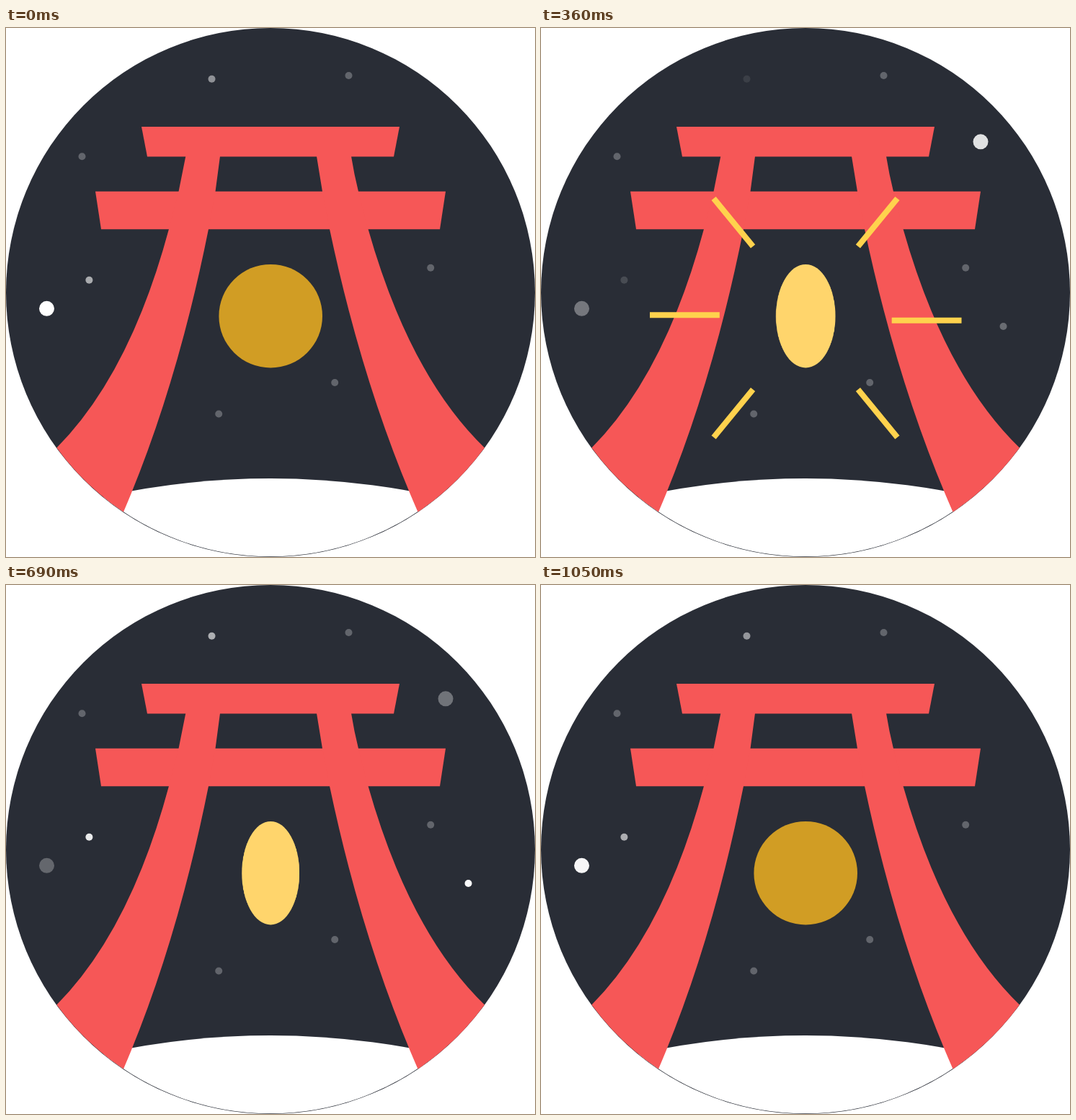
An HTML page that plays this animation: 734x734 px, repeating every 1.08 s.

```html
<!DOCTYPE html>
<html lang="en">
<head>
<meta charset="utf-8">
<title>Torii gate at night</title>
<style>
html, body { margin: 0; width: 100%; height: 100%; overflow: hidden; background: #fff; }
svg { display: block; width: 100vw; height: 100vh; }

.sky { fill: #292d36; }
.gate { fill: #f65757; }
.star { fill: #fff; animation: 1080ms linear infinite; }
.still { fill: #fff; opacity: .27; }

.coin {
  transform-origin: 367.2px 399.7px;
  animation: spin 540ms ease-in-out infinite, side 1080ms step-end infinite;
}
.rays {
  fill: none;
  stroke: #ffd24d;
  stroke-width: 8;
}
.rays line {
  stroke-dasharray: 1 3;
  animation: shoot 1080ms linear infinite;
}

.west  { animation-name: west; }
.east  { animation-name: east; }
.north { animation-name: north; }
.left  { animation-name: left; }
.right { animation-name: right; }

@keyframes spin {
  0%, 11.11% { transform: scaleX(1); }
  47.22% { transform: scaleX(0); }
  83.33%, 100% { transform: scaleX(1); }
}
@keyframes side {
  0% { fill: #d19d24; }
  23.61% { fill: #ffd56c; }
  73.61%, 100% { fill: #d19d24; }
}
/* Each ray grows outward, then its inner end catches up. */
@keyframes shoot {
  0%, 20.8% { stroke-dashoffset: 1.02; }
  30.8% { stroke-dashoffset: 0; }
  47%, 100% { stroke-dashoffset: -1.02; }
}
@keyframes west {
  0%, 2.5% { opacity: 1; }
  50.5% { opacity: 0; }
  99.1%, 100% { opacity: 1; }
}
@keyframes east {
  0%, .5% { opacity: 0; }
  38.7% { opacity: 1; }
  76.8%, 100% { opacity: 0; }
}
@keyframes north {
  0% { opacity: .48; }
  38% { opacity: .03; }
  80.6% { opacity: 1; }
  98.1%, 100% { opacity: .48; }
}
@keyframes left {
  0%, 1.4% { opacity: .6; }
  28.7% { opacity: .03; }
  67.6%, 75% { opacity: 1; }
  98.1%, 100% { opacity: .6; }
}
@keyframes right {
  0%, 20% { opacity: 0; }
  64.8% { opacity: 1; }
  96.3%, 100% { opacity: 0; }
}
</style>
</head>
<body>
<svg viewBox="0 0 734 734">
  <circle class="sky" cx="367" cy="367" r="367"/>
  <path fill="#fff" d="M134.6 650.3Q367 599.7 599.4 650.3A367 367 0 0 1 134.6 650.3Z"/>

  <g class="still">
    <circle cx="475.5" cy="66" r="5"/>
    <circle cx="105.5" cy="178.2" r="5"/>
    <circle cx="589.2" cy="332.8" r="5"/>
    <circle cx="456.2" cy="492" r="5"/>
    <circle cx="295.2" cy="535.5" r="5"/>
  </g>
  <circle class="star west" cx="56.5" cy="389.3" r="10.5"/>
  <circle class="star east" cx="610" cy="157.8" r="10.5"/>
  <circle class="star north" cx="285.5" cy="70.8" r="5"/>
  <circle class="star left" cx="115.4" cy="349.8" r="5"/>
  <circle class="star right" cx="641.5" cy="414" r="5"/>

  <g class="gate">
    <path d="M188 137H546L538 178.5H196Z"/>
    <path d="M124 226.8H610L602 279.3H132Z"/>
    <path d="M249.3 178L239.5 227L226 279Q172 480 70.3 582.5A367 367 0 0 0 163 671.5Q237 499 281 279L290.5 227L297 178Z"/>
    <path d="M479 178Q483 203 489 227L502.5 279Q560 482 664 582.5A367 367 0 0 1 571.5 671.5Q495 497 449 279L439 227L431 178Z"/>
  </g>

  <circle class="coin" cx="367.2" cy="399.7" r="71.8"/>

  <g class="rays">
    <line pathLength="1" x1="267" y1="398.2" x2="151" y2="398.2"/>
    <line pathLength="1" x1="467.5" y1="405.8" x2="583.5" y2="405.8"/>
    <line pathLength="1" x1="304.9" y1="316.1" x2="239.6" y2="236.5"/>
    <line pathLength="1" x1="429.1" y1="316.1" x2="494.4" y2="236.5"/>
    <line pathLength="1" x1="304.9" y1="488.4" x2="239.6" y2="568"/>
    <line pathLength="1" x1="429.1" y1="488.4" x2="494.4" y2="568"/>
  </g>
</svg>
</body>
</html>
```
